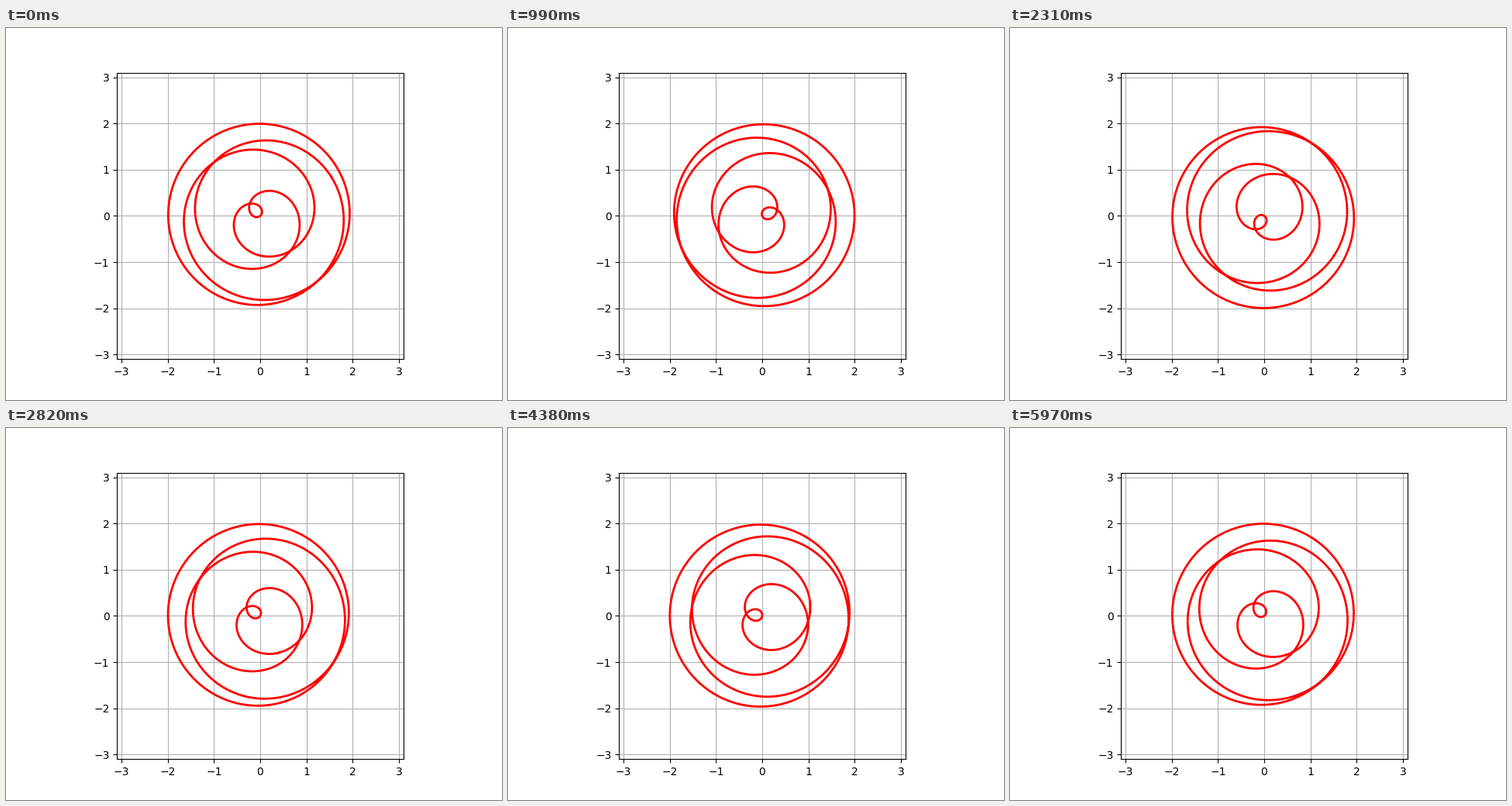
A matplotlib script that plays this animation: 640x480 px, repeating every 6000 ms.

```python
import numpy as np
import matplotlib.pyplot as plt
from matplotlib.animation import FuncAnimation

FRAMES = 200
INTERVAL = 30
LIMIT = 3.1

t = np.linspace(0, 2 * np.pi, 1000)

fig, ax = plt.subplots(figsize=(6.4, 4.8), dpi=100)
ax.set_aspect("equal")
ax.set_xlim(-LIMIT, LIMIT)
ax.set_ylim(-LIMIT, LIMIT)
ax.set_xticks(range(-3, 4))
ax.set_yticks(range(-3, 4))
ax.grid(True)
line, = ax.plot([], [], color="red", lw=2)


def update(i):
    # Sum of two unit vectors turning at rates 4 and 5
    phase = 1 + 0.3 * i
    line.set_data(np.cos(4 * t) + np.cos(5 * t + phase),
                  np.sin(4 * t) + np.sin(5 * t + phase))
    return line,


anim = FuncAnimation(fig, update, frames=FRAMES, interval=INTERVAL,
                     repeat=True, repeat_delay=0, blit=False)
plt.show()
```
